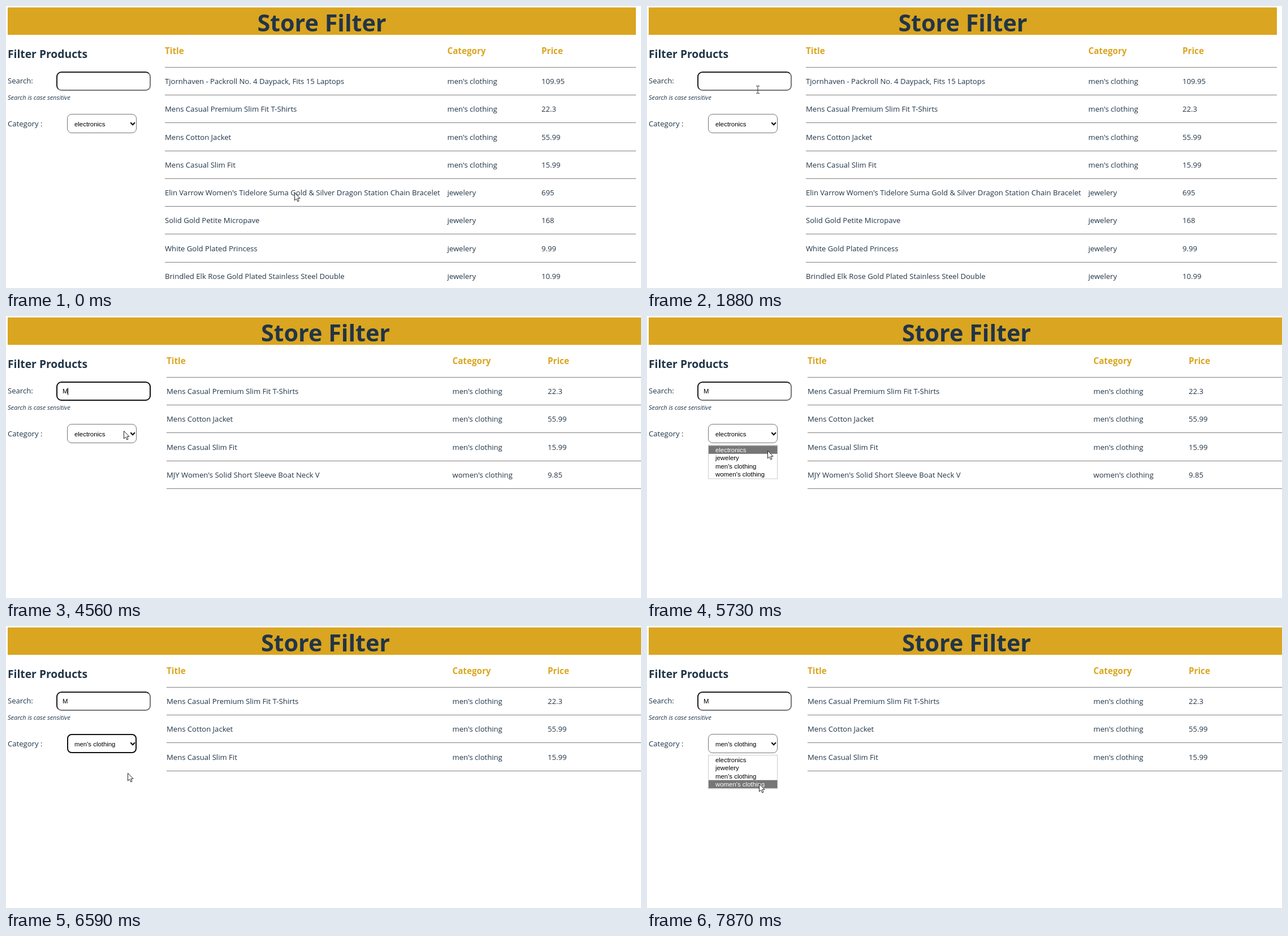
Recreate the animation shown at these times as an HTML page. Size 1123 px wide and 499 px high, loop 8000 ms.

```html
<!DOCTYPE html>
<html lang="en">
<head>
<meta charset="utf-8">
<title>Store Filter</title>
<style>
  html, body { margin: 0; width: 100%; height: 100%; overflow: hidden; background: #fff; }
  svg, .box { position: absolute; box-sizing: border-box; }
  svg { left: 0; top: 0; width: 1123px; height: 499px; }
  text { font: 13.1px "Open Sans", "Noto Sans", sans-serif; fill: #213547; white-space: pre; }
  text.h1 { font-size: 41.3px; font-weight: 700; text-anchor: middle; }
  text.h2 { font-size: 19.3px; font-weight: 700; }
  text.th { font-size: 15.2px; font-weight: 700; fill: #daa520; }
  text.hint { font-size: 11px; font-style: italic; }
  text.ui { font: 11.4px "Liberation Sans", Arial, sans-serif; fill: #000; }
  .gold { fill: #daa520; }
  .line { fill: #808080; }
  #search { left: 89px; top: 116px; width: 167px; height: 34px; border: 2px solid; border-color: #1c1c20 #767676 #767676 #1c1c20; border-radius: 9px; }
  #select { left: 108px; top: 191px; width: 123px; height: 34px; border: 1px solid #767676; border-radius: 8px; }
  #search.focus, #select.focus { border: 2px solid #101014; }
</style>
</head>
<body>
<div class="box" id="search"></div>
<div class="box" id="select"></div>
<svg id="stage" viewBox="0 0 1123 499">
  <g id="tables"></g>
  <text class="h2" x="3" y="92">Filter Products</text>
  <text x="3" y="137">Search:</text>
  <text class="hint" x="3" y="166">Search is case sensitive</text>
  <text x="3" y="213">Category :</text>
  <text class="ui" id="typed" x="100" y="137">M</text>
  <rect id="caret" x="109" y="127" width="1" height="13"/>
  <text class="ui" id="value" x="121" y="212.5"></text>
  <path d="M220.3 206.3l3.8 3.9 3.8-3.9" fill="none" stroke="#000" stroke-width="2"/>
  <g id="menu">
    <rect x="108.5" y="228.5" width="122" height="59.5" fill="#fff" stroke="#ccc"/>
    <rect id="mark" x="109" width="121.5" height="14.4" fill="#767676"/>
  </g>
  <path id="arrow" d="M.5 .5V14L3.6 11.2 5.8 16 8 15 5.8 10.3H10Z" fill="#fff" stroke="#222" stroke-linejoin="round"/>
  <path id="beam" d="M-3-6.5H-1L0-5.8 1-6.5H3M0-6V6M-3 6.5H-1L0 5.8 1 6.5H3" fill="none" stroke="#333"/>
</svg>
<script>
const LOOP = 8000;
const $ = id => document.getElementById(id);
const add = (parent, tag, attrs, text = "") => {
  const el = document.createElementNS("http://www.w3.org/2000/svg", tag);
  for (const key in attrs) el.setAttribute(key, attrs[key]);
  el.textContent = text;
  return parent.appendChild(el);
};
const show = (el, on) => { el.style.display = on ? "" : "none"; };

const options = ["electronics", "jewelery", "men's clothing", "women's clothing"];
const products = [
  ["Tjornhaven - Packroll No. 4 Daypack, Fits 15 Laptops", 2, "109.95"],
  ["Mens Casual Premium Slim Fit T-Shirts", 2, "22.3"],
  ["Mens Cotton Jacket", 2, "55.99"],
  ["Mens Casual Slim Fit", 2, "15.99"],
  ["Elin Varrow Women's Tidelore Suma Gold & Silver Dragon Station Chain Bracelet", 1, "695"],
  ["Solid Gold Petite Micropave", 1, "168"],
  ["White Gold Plated Princess", 1, "9.99"],
  ["Brindled Elk Rose Gold Plated Stainless Steel Double", 1, "10.99"],
  ["MJY Women's Solid Short Sleeve Boat Neck V", 3, "9.85"]
];

// Banner and product table; the page widens when the scrollbar goes.
function makeTable(rows, right, center, cols) {
  const g = add($("tables"), "g", {});
  const cells = (row, y, cls) =>
    row.forEach((text, i) => add(g, "text", { x: cols[i], y, class: cls }, text));
  const rule = i => add(g, "rect", {
    x: cols[0], y: Math.round(107.8 + 49.25 * i), width: right - cols[0], height: 1, class: "line"
  });
  add(g, "rect", { x: 3, y: 2.5, width: right - 3, height: 48.5, class: "gold" });
  add(g, "text", { x: center, y: 45, class: "h1" }, "Store Filter");
  cells(["Title", "Category", "Price"], 85.3, "th");
  rule(0);
  rows.forEach(([title, cat, price], i) => {
    cells([title, options[cat], price], Math.round(138 + 49.25 * i), "td");
    rule(i + 1);
  });
  return g;
}
const wide = [1123, 565, [284, 789.5, 958]];
const tables = [
  makeTable(products.slice(0, 8), 1114, 558.5, [281, 780.5, 947]),
  makeTable([...products.slice(1, 4), products[8]], ...wide),
  makeTable(products.slice(1, 4), ...wide)
];

const OPTION_TOP = 229.5, OPTION_H = 14.4;
const labels = options.map((name, i) =>
  add($("menu"), "text", { x: 121, y: 240.7 + OPTION_H * i, class: "ui" }, name));

// Pointer moves: first step, last step, number of steps, target x, y
const moves = [
  [70, 70, 1, 482, 319],
  [260, 470, 4, 359, 255],
  [660, 1010, 6, 249, 169],
  [1200, 1410, 4, 216, 151],
  [1740, 1880, 3, 196, 148],
  [4220, 4560, 5, 208, 203],
  [4630, 4830, 3, 211, 206],
  [5510, 5730, 4, 213, 238],
  [5790, 6260, 8, 215, 260],
  [6710, 7090, 6, 212, 211],
  [7540, 7870, 6, 198, 279]
];

function pointer(t) {
  let x = 510, y = 330;
  for (const [start, end, n, tx, ty] of moves) {
    if (t < start) break;
    const gap = (end - start) / (n - 1) || 1;
    const part = t >= end ? 1 : (Math.floor((t - start) / gap) + 1) / n;
    x += (tx - x) * part;
    y += (ty - y) * part;
  }
  return [x, y];
}

const within = (t, from, to) => t >= from && t < to;

function draw(t) {
  const [x, y] = pointer(t);
  const stage = t < 3430 ? 0 : t < 6390 ? 1 : 2;
  tables.forEach((g, i) => show(g, i === stage));

  $("search").classList.toggle("focus", within(t, 2210, 4970));
  $("select").classList.toggle("focus", within(t, 6390, 7330));
  show($("typed"), t >= 3230);
  show($("caret"), within(t, 3230, 4970) && Math.floor((t - 3230) / 530) % 2 === 0);

  const selected = t < 6390 ? 0 : 2;
  $("value").textContent = options[selected];
  show($("menu"), within(t, 5110, 6390) || t >= 7470);
  const hover = y < OPTION_TOP ? selected : Math.min(3, Math.floor((y - OPTION_TOP) / OPTION_H));
  $("mark").setAttribute("y", OPTION_TOP + OPTION_H * hover);
  labels.forEach((el, i) => { el.style.fill = i === hover ? "#fff" : ""; });

  const overInput = y <= 151 && x < 256;
  show($("arrow"), !overInput);
  show($("beam"), overInput);
  const at = `translate(${Math.round(x)} ${Math.round(y)})`;
  $("arrow").setAttribute("transform", at);
  $("beam").setAttribute("transform", at);
}

const began = performance.now();
function tick() {
  draw((performance.now() - began) % LOOP);
  requestAnimationFrame(tick);
}
tick();
</script>
</body>
</html>
```
